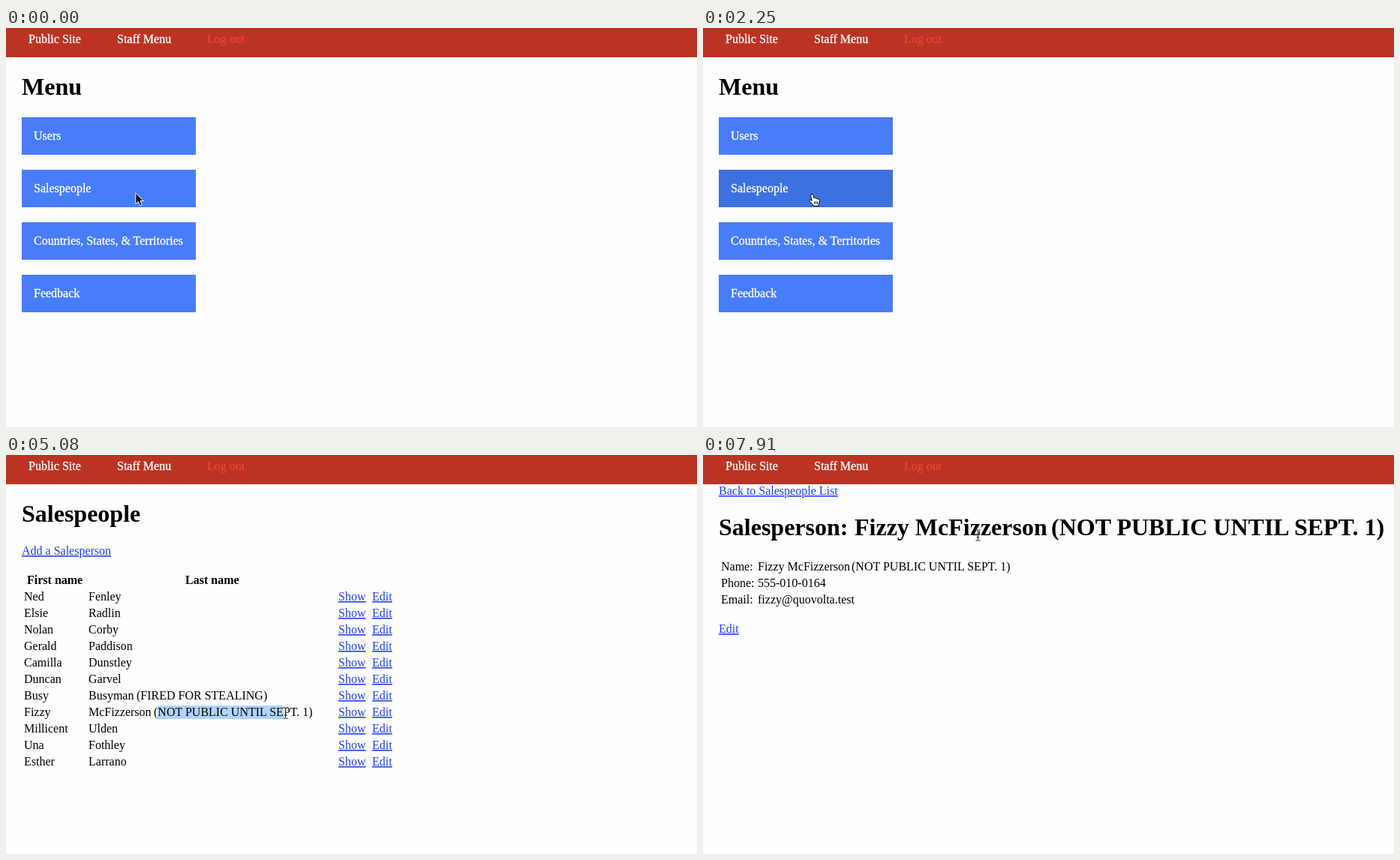
Animation, 921 px wide and 532 px high, one loop 8 s. Source, as an HTML page:

```html
<!DOCTYPE html>
<html lang="en">
<head>
<meta charset="utf-8">
<title>Staff menu</title>
<style>
  html, body { margin: 0; width: 100%; height: 100%; overflow: hidden; background: #fefefe; }
  svg { display: block; width: 921px; height: 532px; }
  text { font: 16px "Liberation Serif", "Times New Roman", serif; white-space: pre; }
  .bold { font-weight: bold; }
  .title { font-size: 32px; font-weight: bold; }
  .link { fill: #1f40ee; text-decoration: underline; text-decoration-skip-ink: none; }
  .light { fill: #fff; stroke: #fff; stroke-width: .3px; }
  .logout { fill: #ee4633; stroke: #ee4633; stroke-width: .2px; }
</style>
</head>
<body>
<svg viewBox="0 0 921 532">
  <rect width="921" height="39" fill="#bb3423"/>
  <g id="nav"></g>
  <g id="menu"></g>
  <g id="list"></g>
  <g id="detail"></g>
  <g id="arrow">
    <path d="M.8 .9V15.6L4.2 12.4L6.5 17.8L9.1 16.7L6.8 11.5H11.2Z" fill="#000" stroke="#fff"/>
  </g>
  <g id="hand" stroke="#000" stroke-linejoin="round" stroke-linecap="round">
    <path fill="#fff" d="M4.2 .7C5.4 .7 5.9 1.6 6.1 2.5L6.9 5.8C8 5.2 9 5.5 9.5 6.4C10.5 5.9 11.6 6.3 12 7.2C13.5 6.9 14.4 7.8 14.4 9.2C14.4 12 13.5 13 13.1 14.2L12.8 16.3H6.4C6 14.5 3.4 12.4 1.1 9.7C.3 8.5 1.8 7.5 3 8.4L4.3 9.5L2.6 2.7C2.3 1.5 3 .7 4.2 .7Z"/>
    <path fill="none" stroke-width=".9" d="M7.6 10.5V13.5M9.6 10.5V13.5M11.6 10.5V13.5"/>
  </g>
  <g id="beam" fill="none">
    <path d="M.5 .5Q3.5 .5 3.5 2.5Q3.5 .5 6.5 .5M3.5 2V14M.5 15.5Q3.5 15.5 3.5 13.5Q3.5 15.5 6.5 15.5M2 10.5H5" stroke="#fff" stroke-width="2" opacity=".5"/>
    <path d="M.5 .5Q3.5 .5 3.5 2.5Q3.5 .5 6.5 .5M3.5 2V14M.5 15.5Q3.5 15.5 3.5 13.5Q3.5 15.5 6.5 15.5M2 10.5H5" stroke="#222"/>
  </g>
</svg>
<script>
const $ = id => document.getElementById(id);

function add(group, tag, attrs, content = '') {
  const el = document.createElementNS('http://www.w3.org/2000/svg', tag);
  for (const key in attrs) el.setAttribute(key, attrs[key]);
  el.textContent = content;
  return $(group).appendChild(el);
}
const label = (group, x, y, content, cls = '') => add(group, 'text', { x, y, class: cls }, content);

// Navigation
label('nav', 30, 20, 'Public Site', 'light');
label('nav', 148, 20, 'Staff Menu', 'light');
label('nav', 268, 20, 'Log out', 'logout');

// Menu page
label('menu', 21, 89, 'Menu', 'title');
const buttons = ['Users', 'Salespeople', 'Countries, States, & Territories', 'Feedback'].map((name, i) => {
  const y = 119 + 70 * i;
  const box = add('menu', 'rect', { x: 21, y, width: 232, height: 50, fill: '#477dfb' });
  label('menu', 37, y + 30, name, 'light');
  return box;
});

// List page
const note = '(NOT PUBLIC UNTIL SEPT. 1)';
const people = [
  ['Ned', 'Fenley'], ['Elsie', 'Radlin'], ['Nolan', 'Corby'], ['Gerald', 'Paddison'],
  ['Camilla', 'Dunstley'], ['Duncan', 'Garvel'], ['Busy', 'Busyman', 174, '(FIRED FOR STEALING)'],
  ['Fizzy', 'McFizzerson', 197, note], ['Millicent', 'Ulden'], ['Una', 'Fothley'], ['Esther', 'Larrano']
];
const selection = add('list', 'rect', { x: 202, y: 334, height: 18, fill: '#b0d4fd' });
label('list', 21, 89, 'Salespeople', 'title');
label('list', 21, 133, 'Add a Salesperson', 'link');
label('list', 28, 172, 'First name', 'bold');
label('list', 239, 172, 'Last name', 'bold');
people.forEach(([first, last, noteX, remark], i) => {
  const y = 194 + 22 * i;
  label('list', 24, y, first);
  label('list', 110, y, last);
  if (remark) label('list', noteX, y, remark);
  label('list', 443, y, 'Show', 'link');
  label('list', 488, y, 'Edit', 'link');
});

// Detail page
label('detail', 21, 53, 'Back to Salespeople List', 'link');
label('detail', 21, 107, 'Salesperson:', 'title');
label('detail', 202, 107, 'Fizzy McFizzerson', 'title');
label('detail', 464, 107, note, 'title');
[['Name:', 'Fizzy McFizzerson'], ['Phone:', '555-010-0164'], ['Email:', 'fizzy@quovolta.test']].forEach(([key, value], i) => {
  label('detail', 24, 154 + 22 * i, key);
  label('detail', 73, 154 + 22 * i, value);
});
label('detail', 198, 154, note);
label('detail', 21, 237, 'Edit', 'link');

// Each track holds [start time, ...values], held until the next entry
const pages = [[0, 'menu'], [2690, 'list'], [6710, 'detail']];
const hover = [[0, 0], [600, 1], [2100, 0], [2250, 1]];
const selected = [[0, 0], [4930, 88], [5080, 168], [5670, 0]];
const pointer = [
  [0, 'arrow', 172, 219],
  [600, 'hand', 166, 225], [750, 'hand', 154, 229], [900, 'hand', 144, 224], [1050, 'hand', 141, 221],
  [3440, 'beam', 160, 234], [3590, 'beam', 206, 275], [3740, 'beam', 240, 305], [3890, 'beam', 251, 315],
  [4180, 'beam', 240, 325], [4330, 'beam', 216, 340], [4480, 'beam', 201, 338], [4630, 'beam', 196, 335],
  [4930, 'beam', 287, 335], [5080, 'beam', 369, 336],
  [5970, 'beam', 395, 340], [6120, 'arrow', 430, 344], [6270, 'hand', 475, 346], [6420, 'hand', 450, 345],
  [7460, 'arrow', 439, 190], [7610, 'arrow', 458, 65], [7910, 'beam', 363, 99]
];

const LOOP = 8000;
const at = (track, t) => track.findLast(step => step[0] <= t).slice(1);
const showOnly = (ids, active) => ids.forEach(id => { $(id).style.display = id === active ? '' : 'none'; });

function draw(t) {
  showOnly(['menu', 'list', 'detail'], at(pages, t)[0]);
  buttons[1].setAttribute('fill', at(hover, t)[0] ? '#3e71e0' : '#477dfb');
  selection.setAttribute('width', at(selected, t)[0]);
  const [kind, x, y] = at(pointer, t);
  showOnly(['arrow', 'hand', 'beam'], kind);
  $(kind).setAttribute('transform', `translate(${x} ${y})`);
}

const start = performance.now();
function tick() {
  draw((performance.now() - start) % LOOP);
  requestAnimationFrame(tick);
}
tick();
</script>
</body>
</html>
```
